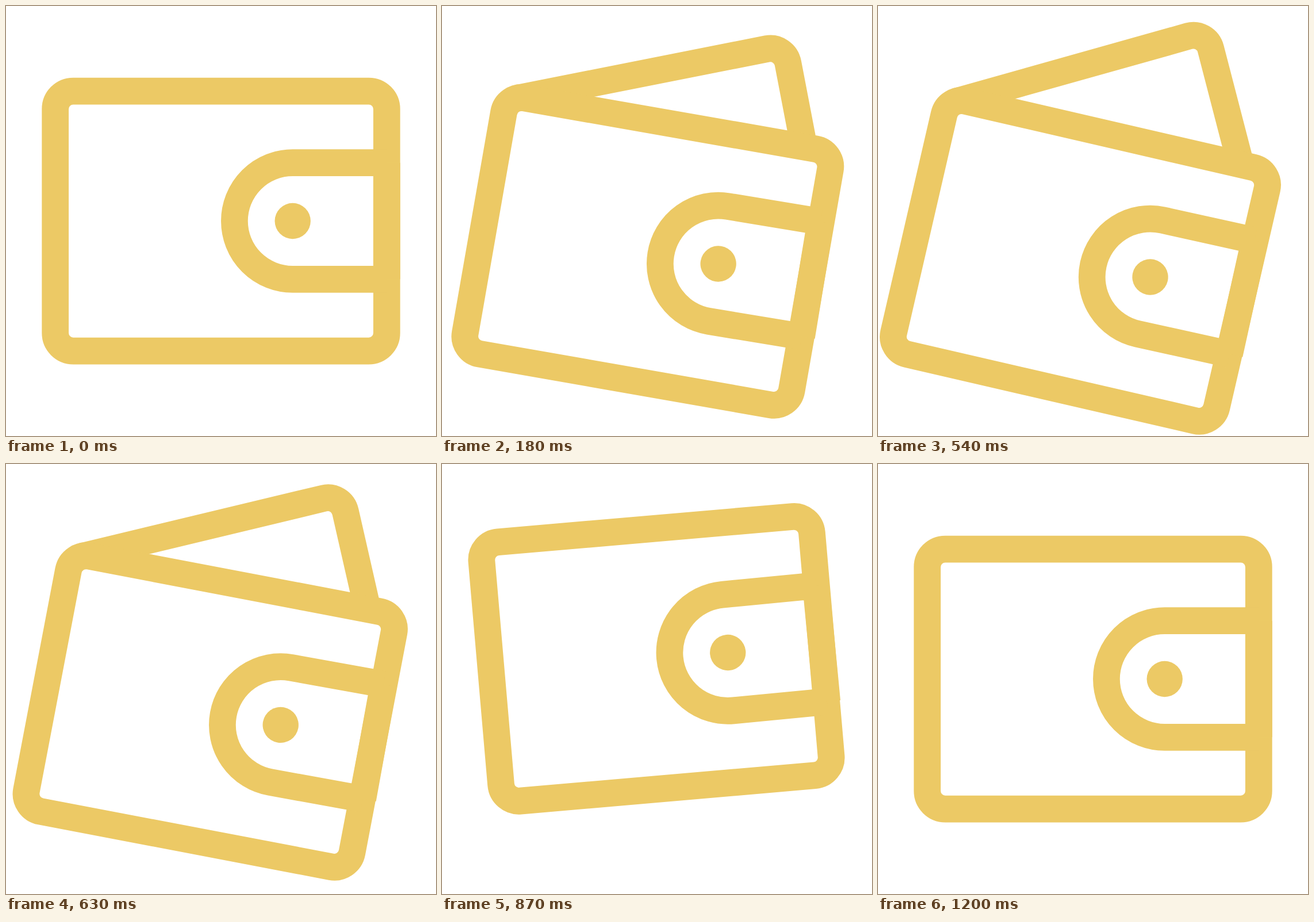
An HTML page that plays this animation: 748x748 px, repeating every 3230 ms.

```html
<!DOCTYPE html>
<html lang="en">
<head>
<meta charset="utf-8">
<title>Wallet</title>
<style>
  html, body { margin: 0; width: 100%; height: 100%; overflow: hidden; background: #fff; }
  svg { display: block; width: 100%; height: 100%; }
</style>
</head>
<body>
<svg viewBox="0 0 748 748" fill="none" stroke="#ecc965" stroke-width="46.75">
  <path id="card"/>
  <g id="front">
    <rect x="-288.3" y="-226" width="576.6" height="452" rx="31.17" fill="#fff"/>
    <g id="clasp">
      <path d="M163.6 -101.3H0A101.3 101.3 0 0 0 0 101.3H163.6M163.6 -101.3V101.3"/>
      <circle r="31.17" fill="#ecc965" stroke="none"/>
    </g>
  </g>
</svg>
<script>
const LOOP = 3230, STEP = 30, END = 1200;
const OPEN = 560, SHUT = 843, SWING = 880;
const R = 31.17;            // corner radius on the centre line
const CORNER = [-257.1, -194.8];
const RAD = Math.PI / 180;

const [card, front, clasp] = ["card", "front", "clasp"].map(id => document.getElementById(id));

const clamp = v => Math.min(1, Math.max(0, v));
const mix = (a, b, k) => a + (b - a) * k;
const smooth = (t, from, to) => {
  const u = clamp((t - from) / (to - from));
  return u * u * (3 - 2 * u);
};
const burst = (t, power) => Math.pow(1 - Math.pow(1 - clamp(t / OPEN), power), 1.5);

function pose(t) {
  if (t >= END) return { angle: 0, x: 0, y: 0, spread: 0, tilt: 0 };
  const rise = burst(t, 4.65), drop = smooth(t, OPEN, SWING);
  const fan = burst(t, 4.35), fold = smooth(t, OPEN, SHUT);
  const back = 1 - smooth(t, SWING, END);
  const travel = (peak, low) => mix(peak * rise, low, drop) * back;
  const x = t < SWING ? mix(-22 * fan, -1, fold) : back * (3.67 - 4.67 * back);
  return {
    angle: travel(13, -5),
    x,
    y: travel(69.4, -35.5),
    spread: 28.7 * fan * (1 - fold),
    tilt: -0.55 * clamp(t / 120) * clamp((END - t) / 120)
  };
}

function cardPath(length, skew) {
  const s = Math.sin(skew * RAD), c = Math.cos(skew * RAD);
  const x = length + R * c, y = -R * s;
  return `M0 ${-R}H${length}A${R} ${R} 0 0 1 ${x} ${y}l${230 * s} ${230 * c}`;
}

function draw(t) {
  const p = pose(t);
  const cx = 374 + p.x, cy = 374 + p.y;
  const s = Math.sin(p.angle * RAD), c = Math.cos(p.angle * RAD);
  const kx = cx + CORNER[0] * c - CORNER[1] * s;
  const ky = cy + CORNER[0] * s + CORNER[1] * c;

  front.setAttribute("transform", `translate(${cx} ${cy}) rotate(${p.angle})`);
  clasp.setAttribute("transform", `translate(124.7 0) rotate(${p.tilt})`);

  // The card hinges on the wallet's upper left corner.
  card.setAttribute("visibility", p.spread > 0.01 ? "visible" : "hidden");
  card.setAttribute("transform", `translate(${kx} ${ky}) rotate(${p.angle - p.spread})`);
  card.setAttribute("d", cardPath(468 - 0.0595 * p.spread ** 2, 2 - 0.11 * p.spread));
}

const start = performance.now();
function tick() {
  const t = (performance.now() - start) % LOOP;
  draw(Math.floor(t / STEP) * STEP);
  requestAnimationFrame(tick);
}
draw(0);
requestAnimationFrame(tick);
</script>
</body>
</html>
```
